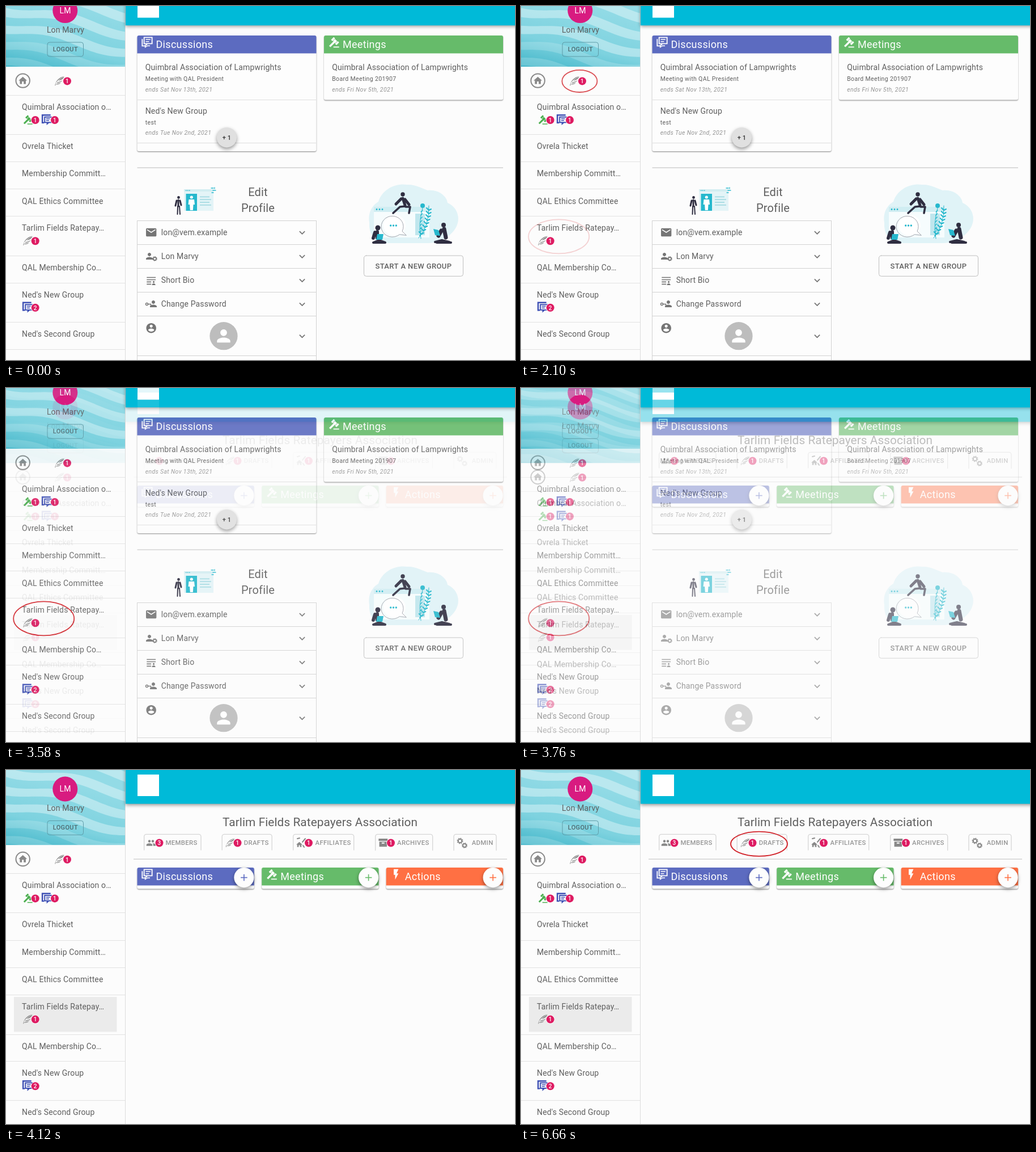
An HTML page with a canvas that plays this animation: 898 by 624 pixels, repeating every 8000 ms.

```html
<!DOCTYPE html>
<html lang="en">
<head>
<meta charset="utf-8">
<title>Group dashboard</title>
<style>
html, body { margin: 0; width: 100%; height: 100%; overflow: hidden; background: #fcfcfc; }
canvas { display: block; width: 898px; height: 624px; }
</style>
</head>
<body>
<canvas id="stage"></canvas>
<script>
const W = 898, H = 624, LOOP = 8000, STEP = 60;
const dpr = window.devicePixelRatio || 1;
const INK = '#5f5f5f', GREY = '#757575', SOFT = '#888', LINE = '#dedede', CYAN = '#00bad8',
  INDIGO = '#5c6bc0', GREEN = '#66bb6a', ORANGE = '#ff7043', PINK = '#de1b62',
  NIGHT = '#2f2e41', TEAL = '#26b8cd';

const USER = 'Lon Marvy', ORG = 'Quimbral Association of Lampwrights',
  TOWN = 'Tarlim Fields Ratepayers Association';

// Icons on a 24 unit grid
const ICONS = {
  mail: 'M20 4H4c-1.1 0-2 .9-2 2v12c0 1.1.9 2 2 2h16c1.1 0 2-.9 2-2V6c0-1.1-.9-2-2-2zm0 4l-8 5-8-5V6l8 5 8-5v2z',
  more: 'M16.59 8.59L12 13.17 7.41 8.59 6 10l6 6 6-6z',
  account: 'M12 2C6.48 2 2 6.48 2 12s4.48 10 10 10 10-4.48 10-10S17.52 2 12 2zm0 3c1.66 0 3 1.34 3 3s-1.34 3-3 3-3-1.34-3-3 1.34-3 3-3zm0 14.2c-2.5 0-4.71-1.28-6-3.22.03-1.99 4-3.08 6-3.08s5.97 1.09 6 3.08c-1.29 1.94-3.5 3.22-6 3.22z',
  person: 'M12 12c2.21 0 4-1.79 4-4s-1.79-4-4-4-4 1.79-4 4 1.79 4 4 4zm0 2c-2.67 0-8 1.34-8 4v2h16v-2c0-2.66-5.33-4-8-4z',
  home: 'M10 20v-6h4v6h5v-8h3L12 3 2 12h3v8z',
  group: 'M16 11a3 3 0 1 0 0-6 3 3 0 0 0 0 6zM8 11a3 3 0 1 0 0-6 3 3 0 0 0 0 6zm0 2c-2.33 0-7 1.17-7 3.5V19h14v-2.5C15 14.17 10.33 13 8 13zm8 0l-1 .05c1.16.84 2 1.97 2 3.45V19h6v-2.5c0-2.33-4.67-3.5-7-3.5z',
  archive: 'M2 3h20v5H2zM3.5 9.5h17V21h-17zM9 11.5v2.5h6v-2.5z',
  bolt: 'M7 1v12h3v10l7-13h-4l4-9z',
  gavel: 'M23 21H11v2h12zM14.3 5.2l4.5 4.5-4.2 4.2-4.5-4.5zM11 10.3l2.8 2.8-9.2 9.2-2.8-2.8zM11.68 1L6.03 6.66l2.83 2.83 5.65-5.66zM20.17 9.48l-5.65 5.66 2.83 2.83L23 12.31z',
  feather: 'M1 23C3 12 10 4 23 1 15 5 8 10 3 17L2.500 23zM9.500 11.500C14 7 19 4 23 2c-2 5-6 8-13.500 9.500zM6 15.500c5-1 9-2 13-5-2 4-7 6.500-13 6.500zM4 19c4 0 8-1 11-2.500-2 3-6 4.500-11 4z',
  chat: 'M4.500 .500h19v15.500H13l-4 4v-4H4.500zM6.700 2.700v11.100h14.600V2.700zM9 5h10v2H9zM9 9.500h7v2H9zM.500 5h2.200v13.500H7v-1h2.200v3.500l2.600-2.500H18v2h-5.500L7 24v-3.300H.500z',
  talk: 'M.500 0h20v3H3.700v14H6v3H.500zM6 4.500h17.500v14.500H17L11.500 24v-5H6zM8.500 7v9.500H21V7zM10.500 8.700h8.500v2h-8.500zM10.500 12.500h6.500v2h-6.500z',
  bio: 'M2 4h20v2H2zM2 9h20v2H2zM2 14h10v2H2zM2 19h10v2H2zM17.5 17a2 2 0 1 0 0-4 2 2 0 0 0 0 4zM13.5 22c0-5 8-5 8 0z'
};
for (const k in ICONS) ICONS[k] = new Path2D(ICONS[k]);

let g;

function layer(draw) {
  const c = document.createElement('canvas');
  c.width = W * dpr;
  c.height = H * dpr;
  g = c.getContext('2d');
  g.scale(dpr, dpr);
  draw();
  return c;
}

function text(s, x, y, { size = 14, color = INK, weight = 400, gap = size * .0107, align = 'left', style = '' } = {}) {
  g.font = `${style} ${weight} ${size}px Roboto, sans-serif`;
  g.letterSpacing = gap + 'px';
  g.textAlign = align;
  g.fillStyle = color;
  g.fillText(s, x, y + size * .35);
}

function icon(name, x, y, size, color) {
  g.save();
  g.translate(x - size / 2, y - size / 2);
  g.scale(size / 24, size / 24);
  g.fillStyle = color;
  g.fill(ICONS[name], 'evenodd');
  g.restore();
}

function rect(x, y, w, h, color) {
  g.fillStyle = color;
  g.fillRect(x, y, w, h);
}

function disc(x, y, r, color) {
  g.fillStyle = color;
  g.beginPath();
  g.arc(x, y, r, 0, 7);
  g.fill();
}

function trace(d, color, width) {
  g.strokeStyle = color;
  g.lineWidth = width;
  g.lineCap = g.lineJoin = 'round';
  g.stroke(new Path2D(d));
}

function shape(d, color) {
  g.fillStyle = color;
  g.fill(new Path2D(d));
}

function frame(x, y, w, h, color, r = 4) {
  g.strokeStyle = color;
  g.lineWidth = 1;
  g.beginPath();
  g.roundRect(x, y, w, h, r);
  g.stroke();
}

function raised(draw, blur = 4, dy = 1.5, alpha = .4) {
  g.save();
  g.shadowColor = `rgba(0,0,0,${alpha})`;
  g.shadowBlur = blur * dpr;
  g.shadowOffsetY = dy * dpr;
  draw();
  g.restore();
}

function badge(n, x, y) {
  disc(x, y, 7.8, '#fcfcfc');
  disc(x, y, 7, PINK);
  text(n, x, y + .2, { size: 10, color: '#fff', align: 'center', weight: 500 });
}

function gear(x, y, r, color) {
  g.strokeStyle = color;
  g.lineCap = 'butt';
  for (const [k, w, dash] of [[.6, .38, []], [.88, .25, [r * .345]]]) {
    g.setLineDash(dash);
    g.lineWidth = r * w;
    g.beginPath();
    g.arc(x, y, r * k, 0, Math.PI * 2);
    g.stroke();
  }
  g.setLineDash([]);
}

// Translucent ripples running down to the right over a teal gradient
function waves() {
  const h = 132.4, fill = g.createLinearGradient(30, 0, 0, h);
  fill.addColorStop(0, '#93dbe6');
  fill.addColorStop(.6, '#7dd2df');
  fill.addColorStop(1, '#43b6c9');
  g.save();
  g.beginPath();
  g.rect(0, 0, 210, h);
  g.clip();
  rect(0, 0, 210, h, fill);
  const edge = (x, y) => y + x * .2 + 7 * Math.sin(x / 32 + 1 + y / 50);
  for (let y = -42; y < h; y += 32) {
    g.fillStyle = `rgba(255,255,255,${y > 80 ? .18 : .36})`;
    g.beginPath();
    for (let x = 0; x <= 210; x += 5) g.lineTo(x, edge(x, y));
    for (let x = 210; x >= 0; x -= 5) g.lineTo(x, edge(x, y + 16));
    g.fill();
  }
  g.restore();
}

function sidebar(dy, selected) {
  g.save();
  g.translate(0, dy);
  waves();
  disc(104.3, 33.5, 22, '#d81b80');
  text('LM', 104.5, 33.5, { color: '#fff', align: 'center' });
  text(USER, 105, 67, { align: 'center' });
  frame(73, 89.4, 63.5, 25, '#5f9ca8');
  text('LOGOUT', 104.8, 101.6, { size: 11, weight: 500, gap: .35, align: 'center', color: '#4f6a70' });

  g.strokeStyle = SOFT;
  g.lineWidth = 2;
  g.beginPath();
  g.arc(29.7, 157, 12.2, 0, 7);
  g.stroke();
  icon('home', 29.7, 156.8, 18, SOFT);
  icon('feather', 94.5, 157.3, 18, SOFT);
  badge('1', 108, 157.8);

  if (selected) rect(14, 400, 181.5, 61.5, '#ebebeb');
  const items = [
    ['Quimbral Association o…', 203.3], ['Ovrela Thicket', 272.5], ['Membership Committ…', 320.8],
    ['QAL Ethics Committee', 369], ['Tarlim Fields Ratepay…', 416.6], ['QAL Membership Co…', 486.8],
    ["Ned's New Group", 534.1], ["Ned's Second Group", 603.5]
  ];
  for (const [s, y] of items) text(s, 28, y);
  icon('gavel', 38.5, 226, 18, '#4caf50');
  badge('1', 51.7, 226.4);
  icon('talk', 72, 226, 19, '#3f51b5');
  badge('1', 86, 226.4);
  icon('feather', 38.5, 439, 18, SOFT);
  badge('1', 51.7, 439.6);
  icon('talk', 38, 556.5, 19, '#3f51b5');
  badge('2', 51.7, 557.2);
  g.restore();
  for (const y of [182, 251.4, 299.7, 347.8, 395.5, 465.5, 513, 582, 630])
    rect(0, Math.round(y + dy), 210, 1, '#e2e2e2');
  rect(210, 0, 1, H, '#dcdcdc');
}

function topBar(dy) {
  raised(() => rect(211, dy - 10, W, 69.6, CYAN), 6, 2);
  rect(232, 8 + dy, 38, 38, '#fff');
}

function card(x, y, w, h, head, color, glyph, title) {
  raised(() => {
    g.fillStyle = '#fdfdfd';
    g.beginPath();
    g.roundRect(x, y, w, h, 3);
    g.fill();
  }, 2, 1.2, .42);
  g.fillStyle = color;
  g.beginPath();
  g.roundRect(x, y, w, head, [3, 3, 0, 0]);
  g.fill();
  icon(glyph, x + 17.5, y + 12, 20, '#fff');
  text(title, x + 33, y + 15.8, { size: 18, color: '#fff', gap: .3 });
}

function entry(x, y, title, note, ends) {
  text(title, x, y);
  text(note, x, y + 20.5, { size: 10.5, gap: .35 });
  text(ends, x, y + 39, { size: 10.5, gap: .35, style: 'italic', color: '#959595' });
}

function profileArt() {
  rect(314, 323, 52, 38, '#e4f4f7');
  rect(314, 323, 52, 4, '#d3edf1');
  rect(317.5, 331, 19.5, 30, TEAL);
  disc(327.3, 337, 2.6, '#fff');
  shape('M322.5 341h9.5l1 9h-2.5l-.7 10h-5l-.7-10h-2.5z', '#fff');
  for (let i = 0; i < 4; i++) rect(342, 335.5 + i * 4.8, i % 2 ? 20 : 17, 1.8, '#a5dbe3');
  for (let i = 0; i < 3; i++) rect(317 + i * 3, 324.5, 1.5, 1.5, TEAL);
  trace('M362 321h4M365 325h5M363 329h3M368 320v2', TEAL, 1.3);
  disc(304.5, 337.5, 2.4, NIGHT);
  trace('M304 342v11M301 343l-2 9M307 343l2 8', NIGHT, 3);
  trace('M303 353l-.5 14M306 353l1 14', NIGHT, 2);
}

function groupArt() {
  shape('M641 382C638 362 648 350 657 345 664 322 688 312 708 315 722 314 735 322 744 325 764 323 778 336 779 347 796 354 803 374 794 390 788 402 768 419 742 418H664C650 416 640 402 641 382z', '#e0f3f7');
  rect(649, 354, 98, 54, '#f6fcfd');
  rect(649, 354, 98, 9, '#d0edf2');
  for (let i = 0; i < 3; i++) disc(654 + i * 5, 358.5, 1.4, TEAL);
  rect(722, 366, 17, 38, '#bfe6ed');

  g.fillStyle = '#fff';
  g.beginPath();
  g.ellipse(685.5, 386.5, 19.5, 18.5, 0, 0, 7);
  g.fill();
  shape('M696 400l10 5-6-11z', '#fff');
  trace('M706 404l-7-7A19.5 18.5 0 1 0 694 403z', '#8a8f98', .8);
  for (let i = -1; i < 2; i++) disc(683.5 + i * 4.8, 387, 1.7, TEAL);

  disc(735, 352, 4, TEAL);
  trace('M732 410Q727 385 735 356M728 409Q747 388 746 352', TEAL, 1);
  for (let i = 0; i < 8; i++) {
    const x = 746 - i * i * .27, y = 360 + i * 6;
    trace(`M${x} ${y}l-4 -4M${x} ${y}l4 -2`, TEAL, 2.1);
    trace(`M${732 - i * .35} ${y + 3}l3 -3`, TEAL, 1.2);
  }

  disc(700, 332, 3.7, NIGHT);
  trace('M700 339L704 351M697 340L688 349M704 341L711 350', NIGHT, 5);
  trace('M704 353L695 354 683 365M705 354L713 354 711 365', NIGHT, 3.6);

  disc(656, 391, 4.5, NIGHT);
  trace('M655 398v11M651 399l-3 10', NIGHT, 6);
  trace('M648 417l10-4 11 4M649 417h18', NIGHT, 4);
  shape('M655 402h11l-2 10h-11z', TEAL);

  disc(772, 386, 4, NIGHT);
  trace('M773 393l3 15M768 396l-5 9', NIGHT, 7);
  trace('M782 416l-13-3-12 3M760 417h25', NIGHT, 4);
  shape('M754 393l9 2 3 10-9-1z', TEAL);
}

function homePage() {
  rect(0, 0, W, H, '#fcfcfc');
  sidebar(-25.4, false);
  topBar(-25.4);

  card(231.5, 52, 316, 204, 31.4, INDIGO, 'chat', 'Discussions');
  entry(245.7, 108.3, ORG, 'Meeting with QAL President', 'ends Sat Nov 13th, 2021');
  rect(232, 165, 315, 1, LINE);
  entry(245.7, 184.7, "Ned's New Group", 'test', 'ends Tue Nov 2nd, 2021');
  rect(232, 241, 315, 1, LINE);
  raised(() => disc(389.4, 231.8, 17.6, '#e0e0e0'), 6, 3);
  text('+ 1', 389.4, 231.8, { size: 11, weight: 500, color: '#333', align: 'center' });
  card(561, 52, 316, 113.5, 31.4, GREEN, 'gavel', 'Meetings');
  entry(575.2, 108.3, ORG, 'Board Meeting 201907', 'ends Fri Nov 5th, 2021');
  rect(231.5, 284.5, 645.5, 1.2, '#c6c6c6');

  profileArt();
  text('Edit', 444.5, 328, { size: 20, gap: .15, align: 'center' });
  text('Profile', 444.5, 356, { size: 20, gap: .15, align: 'center' });

  rect(231, 378, 317, H, '#fdfdfd');
  rect(231, 378, 1, H, '#d2d2d2');
  rect(547, 378, 1, H, '#d2d2d2');
  for (const y of [378, 420, 462, 504, 546, 616]) rect(231, y, 317, 1, '#d2d2d2');
  ['lon@vem.example', USER, 'Short Bio', 'Change Password'].forEach((s, i) => {
    const y = 399 + i * 42.1;
    text(s, 273.7, y);
    icon('more', 522.5, y + .5, 21, GREY);
  });
  icon('mail', 256.2, 399, 22, GREY);
  icon('person', 253, 441, 18, GREY);
  gear(262.5, 445.5, 4.3, GREY);
  icon('bio', 256.2, 484, 19, GREY);
  icon('person', 260, 525, 18, GREY);
  trace('M246.5 525.5a2 2 0 1 0 4 0a2 2 0 1 0 -4 0M250.5 525.5h5v2', GREY, 1.5);
  icon('account', 256.2, 567.8, 21, GREY);
  disc(384, 581.7, 24.6, '#bdbdbd');
  icon('person', 384, 581.7, 35, '#fff');
  icon('more', 522.5, 582, 21, GREY);

  groupArt();
  frame(631.5, 440, 175, 36.3, '#bfbfbf');
  text('START A NEW GROUP', 719, 458.2, { size: 13, weight: 500, gap: .37, align: 'center' });
}

function tab(x, w, label, textX) {
  g.strokeStyle = '#d6d6d6';
  g.lineWidth = 1.3;
  g.beginPath();
  g.moveTo(x, 141.5);
  g.lineTo(x, 117);
  g.arcTo(x, 113.3, x + 4, 113.3, 4);
  g.lineTo(x + w - 4, 113.3);
  g.arcTo(x + w, 113.3, x + w, 117, 4);
  g.lineTo(x + w, 141.5);
  g.stroke();
  text(label, textX, 128, { size: 11.375, weight: 500, gap: .33, color: '#969696' });
}

function groupPage() {
  rect(0, 0, W, H, '#fcfcfc');
  sidebar(0, true);
  topBar(0);
  text(TOWN, 554, 91.3, { size: 20.8, gap: .08, align: 'center' });

  tab(243.7, 100.3, 'MEMBERS', 281.5);
  icon('group', 256, 128.5, 18, SOFT);
  badge('3', 270.5, 128.5);
  tab(381.2, 88, 'DRAFTS', 419.7);
  icon('feather', 395.5, 128, 17, SOFT);
  badge('1', 408.5, 128.5);
  tab(506.7, 107, 'AFFILIATES', 545.5);
  icon('home', 517.5, 131.5, 13, SOFT);
  trace('M514 121l4-1M523 127l5-6M524 133l2 3', SOFT, 2);
  badge('1', 534, 128.5);
  tab(651.7, 101, 'ARCHIVES', 690);
  icon('archive', 665.3, 128.2, 19, SOFT);
  badge('1', 679, 128.5);
  tab(790, 75, 'ADMIN', 821.7);
  gear(801, 125, 5.5, SOFT);
  gear(809, 133, 5, SOFT);

  rect(225, 156.5, 659, 1.2, '#c9c9c9');
  const cards = [
    [231.5, INDIGO, 'chat', 'Discussions'], [451.2, GREEN, 'gavel', 'Meetings'], [670.7, ORANGE, 'bolt', 'Actions']
  ];
  for (const [x, color, glyph, title] of cards) {
    card(x, 172, 206.3, 37.5, 31.6, color, glyph, title);
    raised(() => disc(x + 188.4, 189.6, 17.6, '#fdfdfd'), 6, 2.5);
    rect(x + 182.6, 188.8, 11.6, 1.6, color);
    rect(x + 187.6, 183.8, 1.6, 11.6, color);
  }
}

const home = layer(homePage), group = layer(groupPage);
const stage = document.getElementById('stage');
stage.width = W * dpr;
stage.height = H * dpr;
g = stage.getContext('2d');
g.scale(dpr, dpr);

// Share of a ten-step crossfade that begins at the given time
const fade = (t, start) => t < start ? 0 : Math.min(10, Math.floor((t - start) / STEP) + 1) / 10;

function ring(x, y, rx, ry, alpha) {
  g.globalAlpha = alpha;
  g.strokeStyle = '#d2232a';
  g.lineWidth = 1.8;
  g.beginPath();
  g.ellipse(x, y, rx, ry, 0, 0, 7);
  g.stroke();
}

function render(t) {
  const second = fade(t, 2040), page = fade(t, 3580);
  g.globalAlpha = 1;
  g.drawImage(home, 0, 0, W, H);
  ring(103.4, 132.4, 31, 19.6, fade(t, 500) * (1 - second));
  ring(66.7, 406.4, 53.5, 30, second);
  g.globalAlpha = page;
  g.drawImage(group, 0, 0, W, H);
  ring(420, 130.3, 50, 21.6, fade(t, 6120));
}

const start = performance.now();
function tick() {
  render((performance.now() - start) % LOOP);
  requestAnimationFrame(tick);
}
tick();
</script>
</body>
</html>
```
